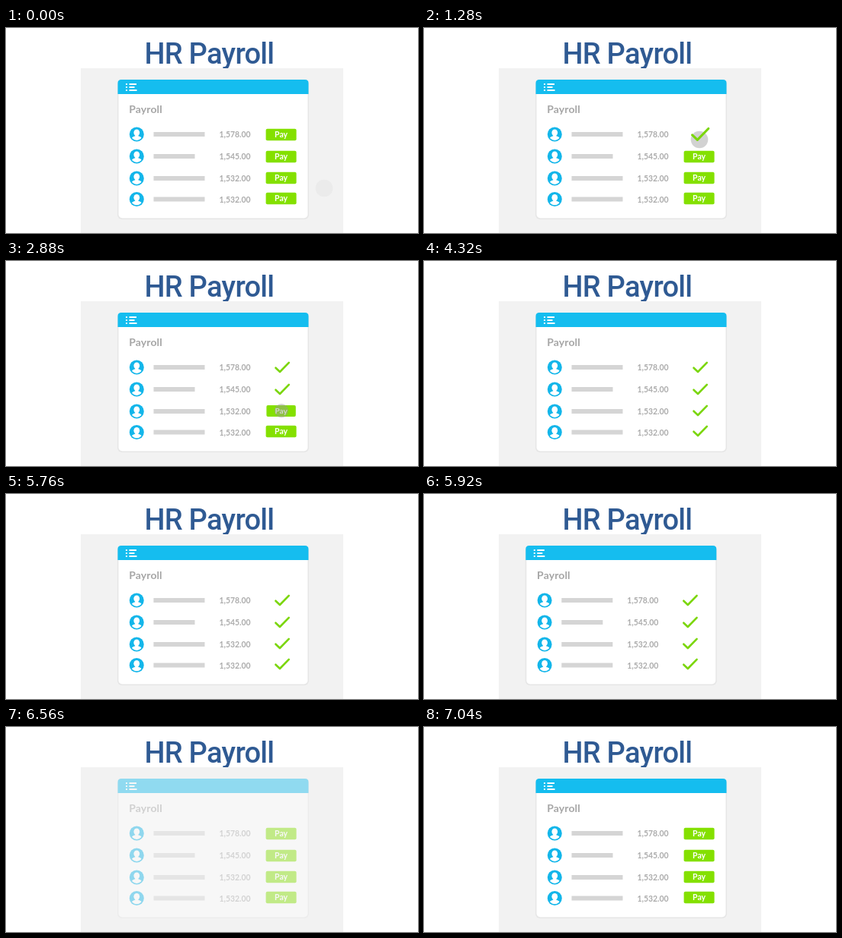
An HTML page that plays this animation: 540x270 px, repeating every 7.08 s.

```html
<!DOCTYPE html>
<html lang="en">
<head>
<meta charset="utf-8">
<title>HR Payroll</title>
<style>
  html, body { margin: 0; width: 100%; height: 100%; overflow: hidden; background: #fff; }
  svg { display: block; width: 100%; height: 100%; }
  text { font-family: Lato, sans-serif; font-weight: 700; fill: #a6a6a6; }
  .title { font: 500 38px Roboto, sans-serif; letter-spacing: -.7px; fill: #2f5a93; }
  .heading { font-size: 14px; letter-spacing: .1px; }
  .amount { font-size: 10.4px; fill: #acacac; }
  .pay text { font-size: 10.5px; fill: #fff; text-anchor: middle; }
  .check { fill: none; stroke: #7bd60c; stroke-width: 2.6; stroke-linecap: round; stroke-linejoin: round; }
</style>
</head>
<body>
<svg viewBox="0 0 540 270">
  <defs>
    <clipPath id="panel"><rect x="98" y="53" width="344" height="217"/></clipPath>
    <clipPath id="face"><circle r="7.9"/></clipPath>
    <g id="avatar">
      <circle r="9.5" fill="#13b6ea"/>
      <g clip-path="url(#face)" fill="#fff">
        <ellipse cy="-2.2" rx="3.9" ry="4.4"/>
        <path d="M-2 0H2V2.2Q7 3 7.2 8H-7.2Q-7 3-2 2.2Z"/>
      </g>
    </g>
  </defs>
  <text class="title" x="181.5" y="47">HR Payroll</text>
  <rect x="98" y="53" width="344" height="217" fill="#f2f2f2"/>
  <g clip-path="url(#panel)">
    <g id="card">
      <rect x="146" y="69" width="251" height="183" rx="6" fill="#e6e6e6"/>
      <rect x="147.5" y="68" width="248" height="182.5" rx="5" fill="#fff"/>
      <path d="M146.5 87V72.5Q146.5 68 151 68H392Q396.5 68 396.5 72.5V87Z" fill="#15bdef"/>
      <path d="M157 74h2M161.500 74h9.500M157 78h2M161.500 78h7M157 82h2M161.500 82h10" stroke="#fff" stroke-width="1.8"/>
      <text class="heading" x="161.3" y="112.3">Payroll</text>
      <g id="rows"></g>
      <g id="buttons"></g>
      <circle id="cursor" fill="#9c9c9c"/>
      <g id="checks"></g>
    </g>
  </g>
</svg>
<script>
const LOOP = 7080, STEP = 960, FIRST_PRESS = 960, RESET = 6400;
const rows = [
  { y: 140, buttonY: 140.5, bar: 67, amount: '1,578.00' },
  { y: 169, buttonY: 169.5, bar: 54, amount: '1,545.00' },
  { y: 198, buttonY: 197.5, bar: 67, amount: '1,532.00' },
  { y: 225.5, buttonY: 224.5, bar: 67, amount: '1,532.00' }
];
const $ = id => document.getElementById(id);
const clamp = v => Math.min(1, Math.max(0, v));
const ramp = (t, from, to) => clamp((t - from) / (to - from));
const smooth = u => u * u * (3 - 2 * u);
const mix = (a, b, u) => a + (b - a) * u;

$('rows').innerHTML = rows.map(r => `
  <use href="#avatar" x="171.300" y="${r.y}"/>
  <rect x="193.500" y="${r.y - 3}" width="${r.bar}" height="6" fill="#d5d5d5"/>
  <text class="amount" x="279.500" y="${r.y + 4}">${r.amount}</text>`).join('');
$('buttons').innerHTML = rows.map(() => `
  <g class="pay"><rect x="-20" y="-7.800" width="40" height="15.600" rx="2" fill="#84e000"/><text y="3.400">Pay</text></g>`).join('');
$('checks').innerHTML = rows.map(() => '<path class="check" d="M-8.500 .500L-3 5.800L8.800-6.300"/>').join('');

const buttons = [...$('buttons').children], checks = [...$('checks').children];
const place = (el, x, y, scale) => {
  el.setAttribute('transform', `translate(${x} ${y}) scale(${scale})`);
  el.style.display = scale > 0 ? '' : 'none';
};

// Dip around the moment of a press, 0 to 1
const pressure = since => smooth(clamp(1 - Math.abs(since) / 130));

function drawRow(row, i, t) {
  const since = t - FIRST_PRESS - i * STEP;
  const pending = t >= RESET;
  const shrink = 1 - ramp(since, 50, 170);
  const pop = mix(1.25 * smooth(ramp(since, 120, 280)), 1, smooth(ramp(since, 280, 480)));
  place(buttons[i], 360.6, row.buttonY, pending ? 1 : shrink * (1 - .04 * pressure(since)));
  place(checks[i], 362, row.buttonY - .3, pending || since < 120 ? 0 : pop);
}

function drawCursor(t) {
  let x = 417, y = 211, press = 0;
  rows.forEach((row, i) => {
    const start = 120 + i * STEP, u = smooth(ramp(t, start, start + 640));
    x = mix(x, 361, u);
    y = mix(y, row.buttonY - .3, u);
    press += pressure(t - FIRST_PRESS - i * STEP);
  });
  const cursor = $('cursor');
  cursor.setAttribute('cx', x);
  cursor.setAttribute('cy', y);
  cursor.setAttribute('r', 11.3 - 2.2 * press);
  cursor.setAttribute('opacity', mix(.08, .45, ramp(t, 120, 500)) * (1 - ramp(t, 4000, 4300)));
}

function draw(now) {
  const t = now % LOOP;
  const slide = t < RESET ? -344 * ramp(t, 5740, 6407) ** 2.5 : 0;
  const fade = t < RESET ? 1 : 1 - (1 - ramp(t, RESET, 7040)) ** 2;
  $('card').setAttribute('transform', `translate(${slide} 0)`);
  $('card').setAttribute('opacity', fade);
  rows.forEach((row, i) => drawRow(row, i, t));
  drawCursor(t);
}

const origin = performance.now();
function tick() {
  draw(performance.now() - origin);
  requestAnimationFrame(tick);
}
tick();
</script>
</body>
</html>
```
